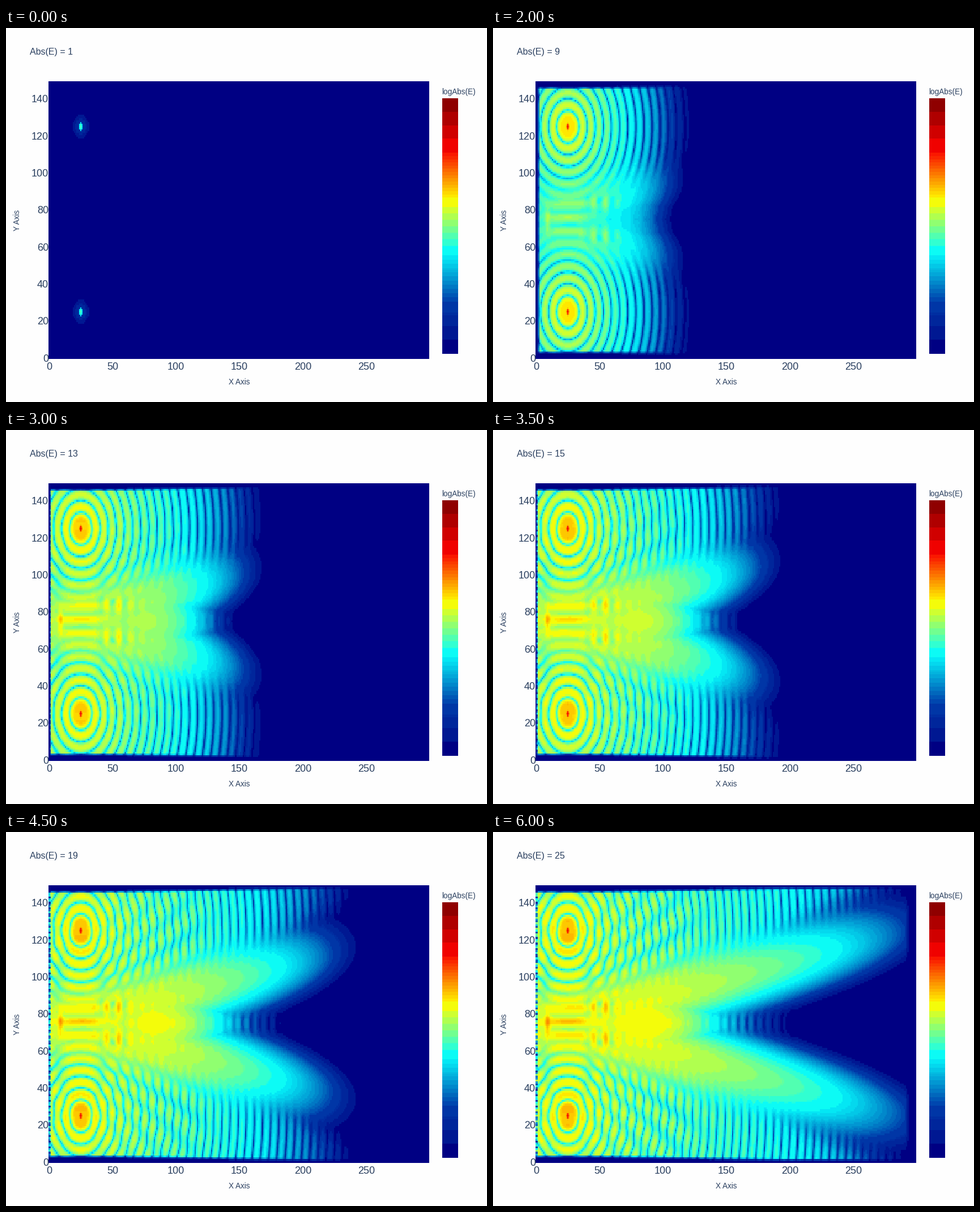
Write a matplotlib script that moves like this. It is 849 px wide and 660 px high and loops after 6.25 s.

```python
import numpy as np
import matplotlib.pyplot as plt
from matplotlib.animation import FuncAnimation
from matplotlib.colors import ListedColormap

W, H, DPI = 849, 660, 64
LEFT, TOP, RIGHT, BOTTOM = 75, 94, 747, 584
NX, NY, FRAMES = 300, 150, 25
INK = "#2a3f5f"
DECADE = 0.24            # colour-scale units per decade of amplitude
K = np.pi / 6.4          # field nulls every 6.4 cells

x, y = np.meshgrid(np.arange(NX), np.arange(NY))
q = np.abs(y - 75)


def jet_steps(n=2048):
    """Jet scale reduced to 3-4-3 bit colour cells, each shown as its mean."""
    t = np.linspace(0, 1, n)
    stops = np.linspace(0, 1, 6)
    rgb = np.column_stack([np.interp(t, stops, c) for c in (
        (0, 0, 5, 255, 250, 128),
        (0, 60, 255, 255, 0, 0),
        (131, 170, 255, 0, 0, 0))])
    r, g, b = rgb.astype(int).T
    key = (r >> 5) * 256 + (g >> 4) * 8 + (b >> 5)
    out = rgb.copy()
    for k in np.unique(key):
        out[key == k] = rgb[key == k].mean(axis=0)
    out[key == key[0]] = 0, 0, 131
    return ListedColormap(out / 255)


def bump(u, centre, width):
    return np.exp(-((u - centre) / width) ** 2)


def amplitude(v):
    return 10 ** (np.maximum(v, 0) / DECADE) - 1


def rise(r, n):
    """Growth of the field behind the front, which moves steadily outward."""
    front = np.hypot(12.3 * n - 12, 8.5)
    return 1 - np.exp(-np.maximum(front - r, 0) / (22 + 1.15 * n))


def source_wave(r, yy, n):
    """Rings of one source, weaker beyond the ray that bounds its own side."""
    level = (.735 - .12 * np.log10(np.maximum(r, 5))) * rise(r, n)
    edge = 75 + .33 * (x - 25)
    loss = .06 / (1 + np.exp((yy - edge) / 4))
    loss = loss + .006 * np.maximum(edge - yy, 0) * np.clip((x - 110) / 90, 0, 1)
    return amplitude(level - loss) * (np.cos(K * np.maximum(r, 5.6) + .393) + .1j)


def smooth_wave(r, n):
    """Central blob and the two lobes that leave it along straight rays."""
    up = rise(r, n)
    off = q - .185 * np.maximum(x - 25, 0)
    lobe = (.58 - .0006 * np.maximum(x - 90, 0)) * up
    lobe = lobe - (off / np.where(off > 0, 50, 40)) ** 2
    blob = .61 * up - ((x - 85) / 120) ** 2 - (q / 50) ** 2

    bands = .08 * np.cos(np.pi * (y - 76) / 4) * bump(x, 26, 16) * bump(y, 79, 12)
    spots = .09 * np.cos(np.pi * (x - 45) / 5) * bump(x, 52, 12) * bump(q, 9, 5)
    wall = .1 * bump(x, 9, 2) * bump(y, 75, 7)
    return amplitude(np.maximum(lobe, blob) + (bands + spots + wall) * up)


def field(n):
    r_top = np.hypot(x - 25, y - 125)
    r_low = np.hypot(x - 25, y - 25)
    waves = source_wave(r_top, y, n) + source_wave(r_low, 150 - y, n)
    smooth = smooth_wave(np.minimum(r_top, r_low), n)
    v = DECADE * np.log10(1 + np.hypot(np.abs(waves), smooth))

    # absorbing borders
    rim = np.clip(2.6 - x / 75, 0, 2)
    v = v * np.clip((np.minimum(y, 149 - y) - rim) / 2, 0, 1)
    v = v * np.clip((295 - x) / 4, 0, 1)
    v = v * np.clip((x - 3.2 + .25 * n) / 2, 0, 1)
    v = np.where(x < 2, v * (.65 + .3 * np.cos(2 * y)), v)

    # bright cores
    grow = 1 - .45 * np.exp(-(n - 1) / 3)
    for cy in (25, 125):
        rho = np.hypot(x - 25, (y - cy) / 1.6)
        v = np.where(rho < 1.6, np.maximum(v, grow * (.83 - .11 * rho ** 2)), v)
    return v


fig = plt.figure(figsize=(W / DPI, H / DPI), dpi=DPI, facecolor="#fefefe")
cmap = jet_steps()


def panel(left, top, right, bottom, data):
    ax = fig.add_axes([left / W, 1 - bottom / H, (right - left) / W, (bottom - top) / H])
    ax.axis("off")
    return ax.imshow(data, cmap=cmap, vmin=0, vmax=1, origin="lower",
                     aspect="auto", interpolation="nearest")


def label(px, py, s, size, ha="center", **kw):
    return fig.text(px / W, 1 - py / H, s, fontsize=size * 72 / DPI, ha=ha,
                    va="baseline", color=INK, family="Liberation Sans", **kw)


image = panel(LEFT, TOP, RIGHT, BOTTOM, field(1))
panel(770, 124, 798, 575, np.linspace(0, 1, 451)[:, None])

for v in range(0, NX, 50):
    label(LEFT + (v + .5) * (RIGHT - LEFT) / NX, 603, str(v), 18)
for v in range(0, NY, 20):
    label(75, BOTTOM - (v + .5) * (BOTTOM - TOP) / NY + 6.4, str(v), 18, "right")
label(411.5, 629, "X Axis", 13.5)
label(23.5, 339, "Y Axis", 13.5, rotation=90, rotation_mode="anchor")
label(769.5, 117, "logAbs(E)", 13.5, "left")
title = label(42.5, 47, "", 16, "left")


def update(i):
    image.set_data(field(i + 1))
    title.set_text(f"Abs(E) = {i + 1}")
    return image, title


anim = FuncAnimation(fig, update, frames=FRAMES, interval=250, repeat=True, repeat_delay=0)
plt.show()
```
